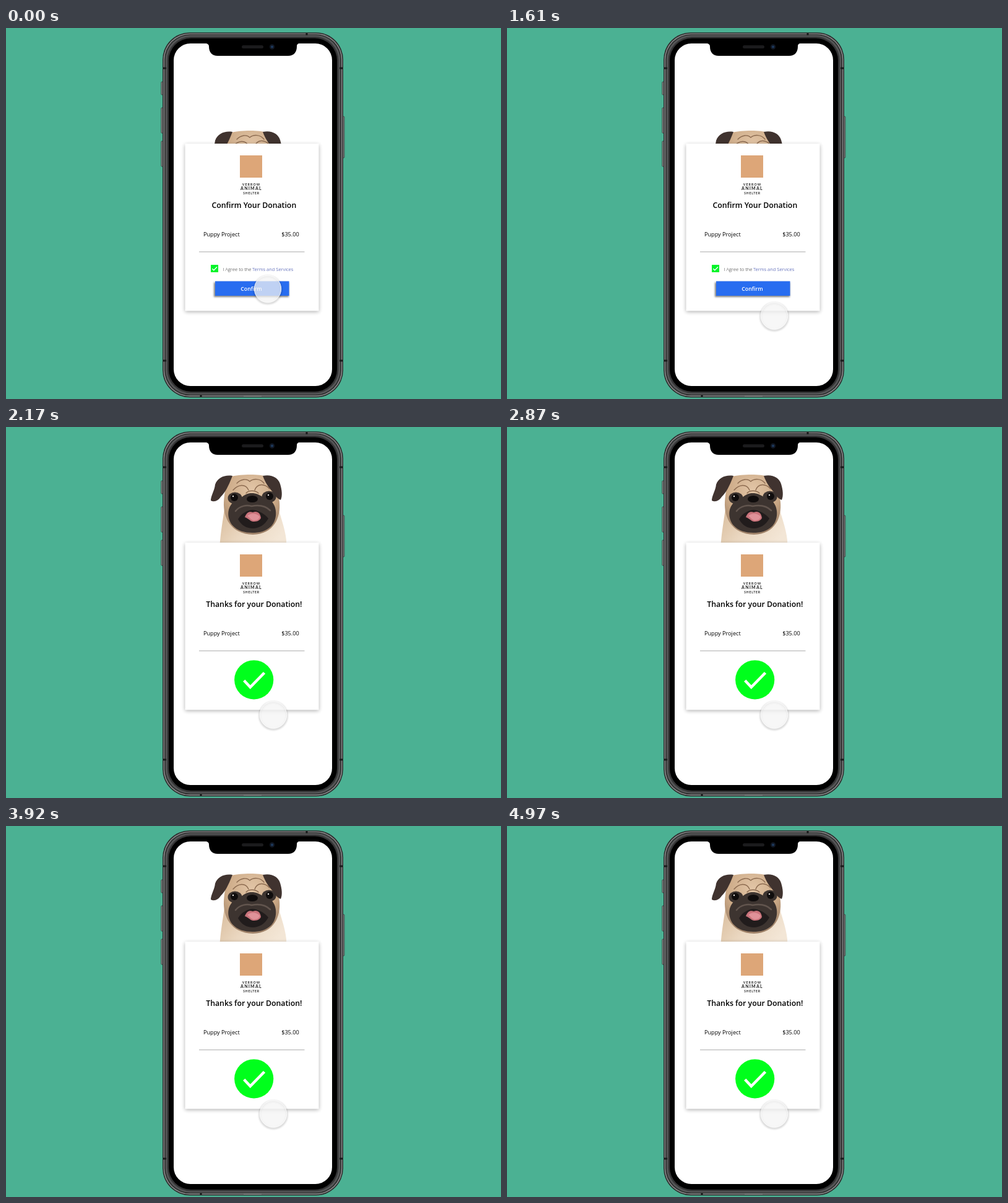
Write an HTML page that moves like this. It is 800 by 600 pixels and loops after 5040 ms.

```html
<!DOCTYPE html>
<html lang="en">
<head>
<meta charset="utf-8">
<title>Donation confirmation</title>
<style>
  html, body { margin: 0; width: 100%; height: 100%; overflow: hidden; background: #4bb193; }
  svg { display: block; width: 100vw; height: 100vh; }
  text { font-family: "Open Sans", "Noto Sans", sans-serif; fill: #000; }
  .mid { text-anchor: middle; }
  .title { font-size: 12.3px; font-weight: 600; }
  .row { font-size: 9.15px; }
  .terms { font-size: 7.7px; font-weight: 300; fill: #222; }
  .link { fill: #1c2f9c; }
  .org { font-family: Lato, "Open Sans", sans-serif; font-weight: 700; fill: #222; }
</style>
</head>
<body>
<svg viewBox="0 0 800 600">
  <defs>
    <radialGradient id="fur" cx=".5" cy=".25" r=".75">
      <stop offset="0" stop-color="#e2c5a6"/>
      <stop offset=".6" stop-color="#cdab88"/>
      <stop offset="1" stop-color="#9c7f66"/>
    </radialGradient>
    <linearGradient id="coat" x2="1" y2=".5">
      <stop offset="0" stop-color="#d8bb9a"/>
      <stop offset=".5" stop-color="#ead7c0"/>
      <stop offset="1" stop-color="#f3e6d6"/>
    </linearGradient>
    <filter id="soft" x="-20%" y="-20%" width="140%" height="140%">
      <feGaussianBlur stdDeviation="3.2"/>
    </filter>
    <filter id="near" x="-20%" y="-30%" width="140%" height="160%">
      <feGaussianBlur stdDeviation="1.5"/>
    </filter>
    <clipPath id="screen"><rect x="271" y="25" width="256" height="554" rx="27"/></clipPath>
  </defs>

  <rect width="800" height="600" fill="#4bb193"/>

  <!-- phone body -->
  <g fill="#7d7f7f" stroke="#303232" stroke-width=".7">
    <rect x="250.800" y="87" width="4" height="21" rx="1"/>
    <rect x="250.800" y="129" width="4" height="41" rx="1"/>
    <rect x="250.800" y="183" width="4" height="41" rx="1"/>
    <rect x="543" y="143" width="3.800" height="67" rx="1"/>
  </g>
  <rect x="253" y="7.200" width="292" height="590.300" rx="44" fill="#2b2c2c"/>
  <rect x="254.500" y="8.700" width="289" height="587.300" rx="42.500" fill="#858687"/>
  <rect x="256.200" y="10.300" width="285.600" height="584" rx="41" fill="#282929"/>
  <rect x="257.700" y="11.500" width="282.600" height="581.500" rx="40" fill="#555657"/>
  <rect x="260.500" y="14" width="277" height="576.500" rx="38" fill="#353536"/>
  <rect x="263" y="16.500" width="272" height="571.500" rx="36" fill="#000"/>
  <path d="M254 65h5M539 65h5M254 538h5M539 538h5M486 8v4M315 593v4" stroke="#1b1c1c" stroke-width="3"/>
  <path d="M384 595.500h29" stroke="#a3a5a5"/>
  <rect x="271" y="25" width="256" height="554" rx="27" fill="#fff"/>

  <g clip-path="url(#screen)">
    <g id="dog">
      <path d="M353 132C350 155 347 168 345 198H453C455 178 448 158 440 132Z" fill="url(#coat)"/>
      <path d="M364 80C380 76 412 76 420 80C434 88 440 102 442 122C444 145 434 173 399 174C362 173 351 145 352 122C353 104 356 88 364 80Z" fill="url(#fur)"/>
      <path d="M366 79C353 77 342 82 338 93C337 103 331 111 331 119C337 122 343 119 347 113C354 106 359 97 366 79Z" fill="#40332f"/>
      <path d="M415 79C429 76 440 82 443 92C446 102 447 111 444 118C438 116 434 110 430 104C424 97 419 90 415 79Z" fill="#40332f"/>
      <g fill="#3d3430">
        <ellipse cx="370" cy="115" rx="11.500" ry="9.500"/>
        <ellipse cx="425" cy="113" rx="11.500" ry="9.500"/>
        <path d="M397 107C412 107 418 118 430 121C439 132 438 150 429 160C420 169 409 171 398 171C386 171 374 168 366 159C357 148 357 132 366 123C378 118 384 107 397 107Z"/>
      </g>
      <path d="M371 136C378 127 389 126 397 128C408 126 419 127 427 135" fill="none" stroke="#62554e" stroke-width="2.500" stroke-linecap="round"/>
      <path d="M375 149C381 139 390 135 398 134C407 135 417 139 424 148C418 159 408 164 399 164C389 164 380 159 375 149Z" fill="#211c1c"/>
      <g fill="none" stroke="#8c6b50" stroke-width="1.400" stroke-linecap="round">
        <path d="M373 91C380 84 389 83 394 88C400 83 411 83 417 91"/>
        <path d="M367 102C375 93 387 91 392 102M426 100C418 91 406 91 402 102"/>
        <path d="M388 107C392 102 403 102 408 107"/>
      </g>
      <g fill="#100d0d">
        <circle cx="369" cy="114" r="6"/>
        <circle cx="426" cy="112" r="6"/>
        <ellipse cx="398" cy="116.500" rx="9" ry="5.500"/>
      </g>
      <g fill="#e9e4df">
        <circle cx="367" cy="112" r="1.200"/>
        <circle cx="424" cy="110" r="1.200"/>
      </g>
      <path d="M386 146C389 137 394 136 399 138C405 135 411 138 412 147C410 152 405 153 399 153C394 152 391 147 386 146Z" fill="#c9737b"/>
      <path d="M390 144C395 139 405 139 410 145C409 150 405 151 400 151C395 150 394 146 390 144Z" fill="#df9299"/>
    </g>

    <rect x="289.500" y="189" width="216" height="270" fill="#000" opacity=".32" filter="url(#soft)"/>
    <rect x="289.500" y="187" width="216" height="270.500" fill="#fff"/>
    <rect x="378" y="206" width="36" height="36" fill="#dda678"/>
    <g class="mid">
      <text class="org" x="396.500" y="254.700" font-size="5.200" letter-spacing="1.150">VERROW</text>
      <text class="org" x="396.500" y="262.300" font-size="7" letter-spacing="1.250">ANIMAL</text>
      <text class="org" x="396.500" y="268.700" font-size="5" letter-spacing=".850">SHELTER</text>
      <text class="title" id="title" x="400.800" y="290.800"></text>
    </g>
    <text class="row" x="319" y="337.300">Puppy Project</text>
    <text class="row" x="473.700" y="337.300" text-anchor="end">$35.00</text>
    <path d="M312 362H482.500" stroke="#c6c6c6" stroke-width="1.400"/>

    <g id="ask">
      <rect x="331" y="383" width="12" height="12" fill="#00f42a"/>
      <path d="M333.300 389.200L335.800 391.800L341 386.500" fill="none" stroke="#fff" stroke-width="1.300"/>
      <text class="terms" x="350.300" y="392.600">I Agree to the <tspan class="link" x="398">Terms and Services</tspan></text>
      <rect x="336" y="411.500" width="121" height="23.500" fill="#000" opacity=".5" filter="url(#near)"/>
      <rect x="338" y="409.500" width="119.500" height="23.500" fill="#286df0"/>
      <text class="mid" x="396.500" y="425.200" font-size="8.800" font-weight="600" style="fill:#fff">Confirm</text>
    </g>

    <g id="done">
      <circle cx="400.700" cy="408.800" r="31.600" fill="#00ff1c"/>
      <path d="M384.700 410L394.800 420.800L417.500 397.500" fill="none" stroke="#fff" stroke-width="4.500"/>
    </g>

    <g id="touch">
      <circle cy="1.500" r="22" fill="none" stroke="#000" stroke-width="2" opacity=".25" filter="url(#near)"/>
      <circle r="21.700" fill="#f4f4f4" fill-opacity=".74" stroke="#fff" stroke-opacity=".85"/>
    </g>
  </g>

  <!-- notch -->
  <path d="M322 24H475V25C471 25 470 27 470 30C470 39 465 45 456 45H342C333 45 328 39 328 30C328 27 326 25 322 25Z" fill="#000"/>
  <rect x="381" y="28" width="35" height="5" rx="2.500" fill="#1b1b1d"/>
  <circle cx="430" cy="30.500" r="4.200" fill="#111722"/>
  <circle cx="430" cy="30.500" r="2" fill="#1d3a5e"/>
</svg>
<script>
  const LOOP = 5040, RELEASE = 1610, THANKS = 1680;
  const $ = id => document.getElementById(id);
  const show = (id, on) => $(id).setAttribute('visibility', on ? 'visible' : 'hidden');
  const move = (id, x, y) => $(id).setAttribute('transform', `translate(${x} ${y})`);

  function render(t) {
    const released = t >= RELEASE, thanks = t >= THANKS;
    move('touch', released ? 432 : 423, released ? 465.5 : 422);
    move('dog', 0, thanks ? 0 : 89);
    show('ask', !thanks);
    show('done', thanks);
    $('title').textContent = thanks ? 'Thanks for your Donation!' : 'Confirm Your Donation';
  }

  const start = performance.now();
  function tick() {
    render((performance.now() - start) % LOOP);
    requestAnimationFrame(tick);
  }
  tick();
</script>
</body>
</html>
```
